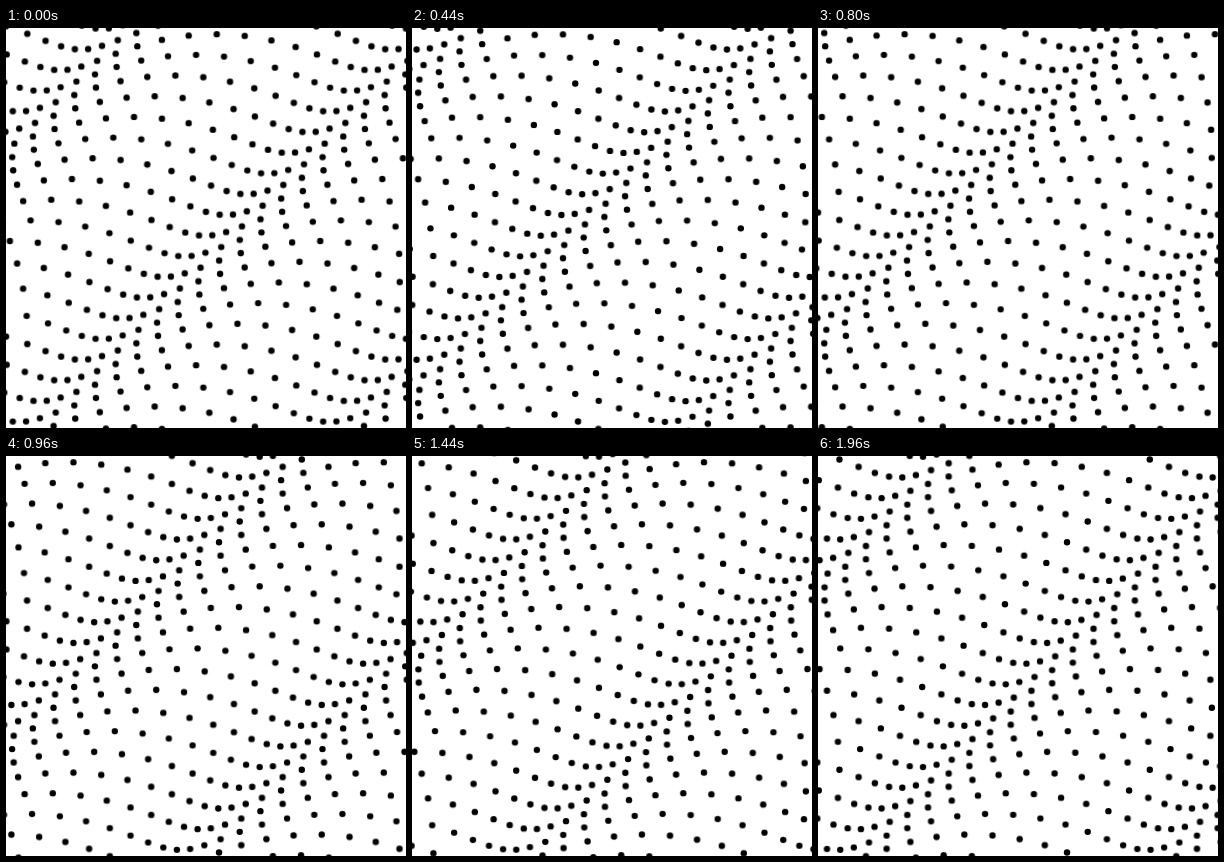
Recreate the animation shown at these times as an HTML page. Size 400 by 400 pixels, loop 2000 ms.

```html
<!DOCTYPE html>
<html lang="en">
<head>
<meta charset="utf-8">
<title>Dot wave</title>
<style>
  html, body { margin: 0; width: 100%; height: 100%; overflow: hidden; background: #fff; }
  svg { display: block; width: 100%; height: 100%; }
  g { animation: orbit 2s steps(50) infinite; }
  @keyframes orbit {
    from { transform: rotate(var(--a)) translateX(18px) rotate(calc(-1 * var(--a))); }
    to { transform: rotate(calc(var(--a) + 360deg)) translateX(18px) rotate(calc(-1 * var(--a) - 360deg)); }
  }
</style>
</head>
<body>
<svg viewBox="0 0 400 400"></svg>
<script>
  const COUNT = 30, GAP = 600 / 29, START = -100;
  const PHASES = 15, FIRST_ANGLE = 127.2, DOT = 3.2;
  const svg = document.querySelector('svg');

  function add(parent, name, attrs) {
    const el = document.createElementNS('http://www.w3.org/2000/svg', name);
    for (const key in attrs) el.setAttribute(key, attrs[key]);
    return parent.appendChild(el);
  }

  // Dots on the same diagonal share one orbit phase.
  const groups = Array.from({ length: PHASES }, (_, k) =>
    add(svg, 'g', { style: `--a: ${FIRST_ANGLE + k * 360 / PHASES}deg` }));

  const place = n => START + n * GAP;
  const visible = v => v > -25 && v < 425;

  for (let i = 0; i < COUNT; i++) {
    for (let j = 0; j < COUNT; j++) {
      const cx = place(i), cy = place(j);
      if (visible(cx) && visible(cy)) add(groups[(i + j) % PHASES], 'circle', { cx, cy, r: DOT });
    }
  }
</script>
</body>
</html>
```
